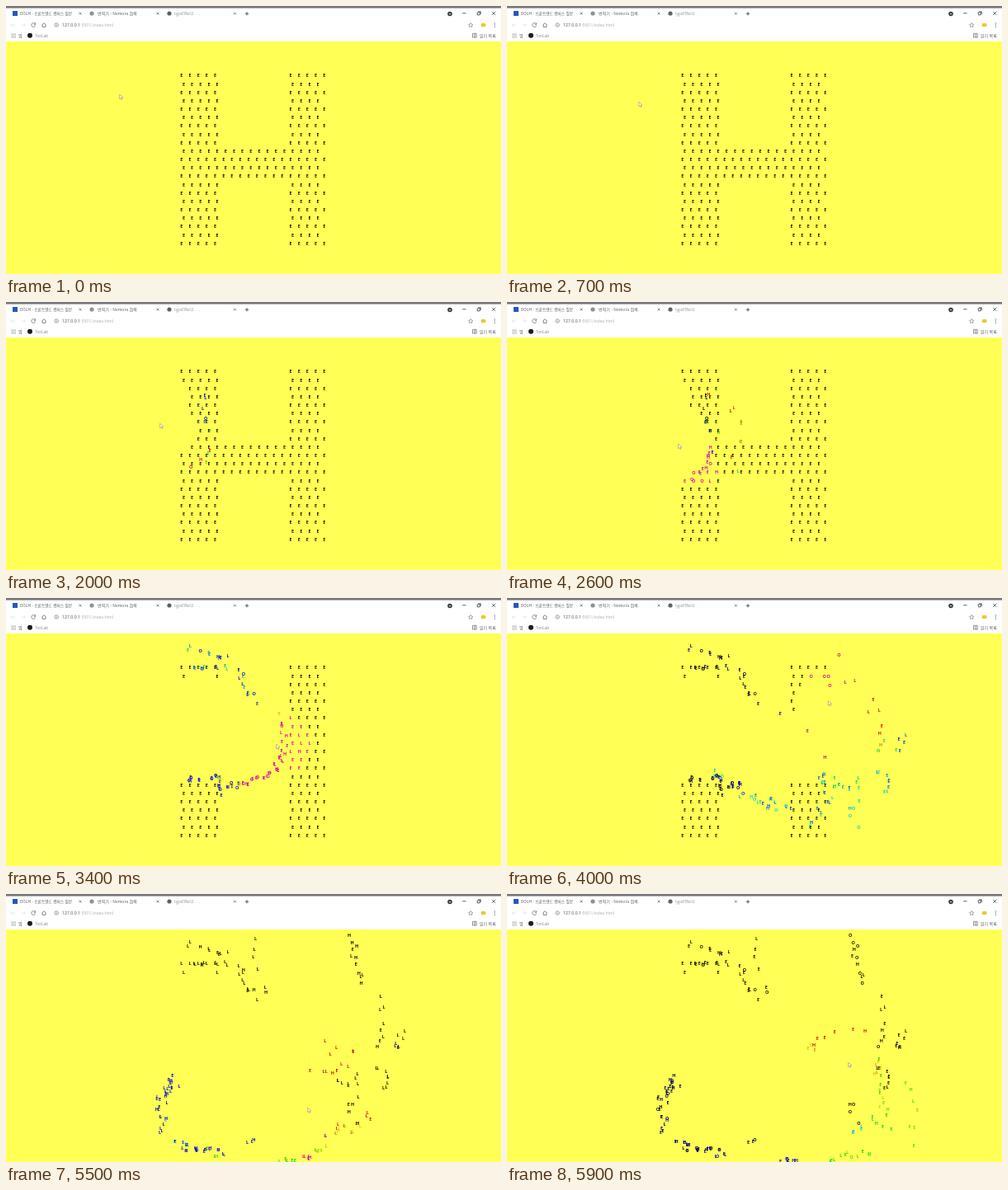
Recreate the animation shown at these times as an HTML page. Size 600 px wide and 325 px high, loop 6000 ms.

```html
<!DOCTYPE html>
<html lang="ko">
<head>
<meta charset="utf-8">
<title>typoEffect2</title>
<style>
html, body { margin: 0; width: 100%; height: 100%; overflow: hidden; background: #ffff55; }
svg { display: block; width: 600px; height: 325px; }
.ui { font: 5px "Noto Sans CJK KR", "Noto Sans CJK", sans-serif; fill: #5c5f63; }
.line { fill: none; stroke: #55585c; stroke-width: .7; }
.pale { stroke: #dddfe2; }
#letters { font: 700 5.4px "Open Sans", sans-serif; }
</style>
</head>
<body>
<svg viewBox="0 0 600 325" xmlns="http://www.w3.org/2000/svg">
  <rect width="600" height="325" fill="#ffff55"/>
  <rect width="600" height="43" fill="#fff"/>
  <rect width="600" height="2.6" fill="#77747a"/>
  <g class="ui">
    <rect x="8" y="6" width="6" height="6" fill="#2856bd"/>
    <text x="17" y="11" font-size="4.7">DOLM - 프론트엔드 캔버스 질문</text>
    <circle cx="104" cy="9" r="2.6" fill="#8793a3"/>
    <text x="111" y="11">번역기 - Nemora 검색</text>
    <circle cx="198" cy="9" r="2.6" fill="#5f6368"/>
    <text x="204" y="10.8" font-size="4.4" fill="#8b8e92">typoEffect2</text>
    <circle cx="538" cy="9.5" r="2.8" fill="#3c4043"/>
    <path d="M536.8 8.9h2.4l-1.2 1.5z" fill="#fff"/>
    <text x="68" y="24.9" font-family="Roboto, sans-serif" font-size="5.3" fill="#5c5f63">127.0.0.1<tspan fill="#b4b7bb">:5501/index.html</tspan></text>
    <text x="15" y="37.8">앱</text>
    <circle cx="29" cy="35.7" r="3" fill="#1b1b1d"/>
    <text x="35" y="37.6" font-size="4.7" fill="#85888c">TonLab</text>
    <text x="574" y="37.6">읽기 목록</text>
    <ellipse cx="578.7" cy="23" rx="3" ry="2.3" fill="#efc52e"/>
    <path d="M592 20.4h1v1h-1zm0 2.2h1v1h-1zm0 2.2h1v1h-1z"/>
    <g id="apps" fill="#85888c"></g>
  </g>
  <g class="line">
    <path d="M88.7 7.7l2.8 2.8m0-2.8l-2.8 2.8M182.6 7.7l2.8 2.8m0-2.8l-2.8 2.8M276 7.7l2.8 2.8m0-2.8l-2.8 2.8"/>
    <path d="M289.8 9.3h4.4m-2.2-2.2v4.4M553.2 8.8h4.4M589.2 6.8l4 4m0-4l-4 4M571.3 7.8h3v3h-3zm1-1h3v3" stroke="#222"/>
    <path class="pale" d="M10.5 23h-4.5m2-2l-2 2 2 2M19 23h4.5m-2-2l2 2-2 2"/>
    <path d="M35.2 21.6a2.4 2.4 0 1 0 .4 2m0-3.2v1.9h-1.9"/>
    <path d="M43.4 23l2.6-2.3 2.6 2.3m-4.4-.5v3h3.6v-3"/>
    <circle cx="61.2" cy="23" r="2.3" stroke-width=".5"/>
    <path d="M61.2 22.6v1.7m0-2.6v.5"/>
    <path d="M563.3 20.4l.8 1.8 1.9.2-1.4 1.3.4 1.9-1.7-1-1.7 1 .4-1.9-1.4-1.3 1.9-.2z" stroke-width=".5"/>
    <path d="M565.5 33.3h4.8v4.8h-4.8zm3 0v4.8m-2-3.3h1m-1 1.6h1" stroke-width=".6"/>
  </g>
  <g id="letters"></g>
  <path id="cursor" d="M0 0v5.2l1.3-1.1.9 1.9.9-.4-.8-1.9 1.7-.2z" fill="#fff" stroke="#666" stroke-width=".45"/>
</svg>
<script>
const LOOP = 6000, STEP = 100, REACH = 40, SETTLE = 40, WORD = 'HELLO';

// pointer: time, x, y
const track = [
  [0, 139, 110], [1300, 180, 127], [2000, 188, 150], [2600, 209, 175],
  [2800, 230, 135], [3000, 268, 145], [3200, 302, 176], [3400, 329, 180],
  [3750, 425, 190], [4150, 370, 90], [4400, 310, 120], [4600, 273, 195],
  [4850, 235, 250], [5050, 262, 272], [5250, 345, 275], [5500, 367, 262],
  [5620, 405, 258], [5900, 415, 207]
];
// time, letters advanced so far
const ticks = [[0, 0.5], [1300, 9.5], [2600, 20.5], [3400, 25.5], [4600, 35.5], [5500, 41.5], [5900, 45.5]];

function along(keys, t) {
  let i = 1;
  while (i < keys.length - 1 && keys[i][0] < t) i++;
  const a = keys[i - 1], b = keys[i];
  const k = Math.min(1, (t - a[0]) / (b[0] - a[0]));
  return a.slice(1).map((v, j) => v + (b[j + 1] - v) * k);
}

let seed = 7;
const rand = () => (seed = (seed * 16807) % 2147483647) / 2147483647;

// n points strewn loosely along a line through a few corners
function strew(n, spread, ...corners) {
  const keys = corners.map((p, i) => [i, ...p]);
  const span = corners.length - 1;
  return Array.from({ length: n }, (_, i) =>
    along(keys, (i + rand()) / n * span).map(v => v + (rand() * 2 - 1) * spread));
}

const letters = [];
for (let row = 0; row < 21; row++) {
  const odd = row % 2, bar = row > 8 && row < 13;
  for (let col = 0; col < 18 - odd; col++) {
    if (!bar && col > 4 && col < 13) continue;
    const x = 213 + odd * 2.6 + col * 10.17, y = 84.5 + row * 10.17;
    letters.push({ x, y, moves: [{ t: -1e6, x, y }], shift: 0, fade: 0.85 + rand() * 0.3 });
  }
}

// first contact with the pointer, or else its nearest approach
function touch(p, t0, t1) {
  let best = { t: t0, d: 1e9 };
  for (let t = t0; t <= t1 - 90; t += 10) {
    const [cx, cy] = along(track, t);
    const d = Math.hypot(p.x - cx, p.y - cy);
    if (d < best.d) best = { t, d };
    if (d < REACH) break;
  }
  return best;
}

// letters in the cleared area fly to the nearest free spot
function sweep(t0, t1, cleared, ...strewn) {
  const spots = strewn.flat(), used = spots.map(() => 0);
  for (const p of letters) {
    const { t, d } = touch(p, t0, t1);
    if (!cleared(p.x, p.y, d)) continue;
    let pick = 0, low = 1e9;
    spots.forEach(([x, y], i) => {
      const cost = Math.hypot(x - p.x, y - p.y) + used[i] * 500;
      if (cost < low) { low = cost; pick = i; }
    });
    const extra = used[pick]++ ? 3 : 0;
    p.x = spots[pick][0] + (rand() - 0.5) * extra;
    p.y = spots[pick][1] + (rand() - 0.5) * extra;
    p.moves.push({ t, x: p.x, y: p.y });
    p.shift = [0, 0, 0, 1, 3, 4][Math.floor(rand() * 6)];
  }
}

sweep(1300, 2600, (x, y, d) => d < REACH,
  strew(9, 5, [241, 100], [241, 140], [254, 160]),
  strew(9, 3, [248, 176], [240, 198], [222, 214]),
  strew(8, 7, [266, 125], [285, 150], [272, 212]));

sweep(2600, 3400,
  (x, y) => (x < 341 && y > 100 && y < 220) || (x > 220 && x < 250 && y > 90 && y < 101),
  strew(9, 6, [222, 63], [272, 70]),
  strew(8, 3, [226, 86], [270, 85]),
  strew(10, 4, [286, 89], [284, 103], [304, 126]),
  strew(10, 3, [217, 221], [258, 215], [261, 238]),
  strew(30, 4, [268, 228], [292, 226], [328, 208], [340, 178], [330, 140]));

sweep(3400, 4600,
  (x, y) => (x > 310 && y < 220) || (x > 266 && x < 341 && y > 200 && y < 240),
  strew(6, 6, [309, 55], [303, 85], [315, 121]),
  strew(11, 5, [417, 50], [424, 80], [435, 112]),
  strew(8, 4, [458, 116], [457, 160], [448, 190]),
  strew(7, 5, [483, 168], [471, 188]),
  strew(8, 3, [446, 205], [466, 222], [456, 237]),
  strew(10, 9, [422, 210], [420, 240], [428, 275]),
  strew(5, 3, [250, 210], [262, 222]),
  strew(20, 8, [278, 231], [297, 242], [345, 262]),
  strew(22, 9, [368, 216], [402, 220], [382, 260], [362, 278]));

sweep(4600, 5500, (x, y) => x < 398 && y > 200,
  strew(30, 7, [207, 224], [188, 240], [190, 290]),
  strew(18, 6, [204, 303], [230, 308], [262, 316]),
  strew(3, 3, [294, 299], [302, 302]),
  strew(24, 8, [325, 319], [367, 315], [400, 292], [455, 265]),
  strew(12, 8, [367, 210], [397, 210], [433, 188], [378, 178]),
  strew(30, 5, [200, 345], [420, 345]));

sweep(5500, 5900,
  (x, y) => x > 355 && x < 444 && y > 172 && y < 326 && !(x > 415 && y > 255),
  strew(10, 6, [366, 190], [378, 172], [437, 162]),
  strew(18, 5, [448, 195], [449, 232], [462, 285]),
  strew(10, 6, [472, 209], [494, 240], [492, 305]),
  strew(11, 4, [388, 322], [412, 316], [442, 314]));

const make = (name, home, attrs = {}) => {
  const node = document.createElementNS('http://www.w3.org/2000/svg', name);
  for (const key in attrs) node.setAttribute(key, attrs[key]);
  return home.appendChild(node);
};
const layer = document.getElementById('letters');
for (const p of letters) p.node = make('text', layer);
const apps = document.getElementById('apps');
for (let i = 0; i < 9; i++) {
  make('rect', apps, { x: 6.5 + i % 3 * 2, y: 33.5 + Math.floor(i / 3) * 2, width: 1.1, height: 1.1 });
}
const cursor = document.getElementById('cursor');

// pink, red, green, cyan, blue, then black
function tint(age) {
  if (age > 1500) return '#161600';
  const light = 45 * Math.min(1, (1500 - age) / 700);
  return `hsl(${Math.min(600, 315 + age * 0.4)} 90% ${light}%)`;
}

function draw(t) {
  const beat = 1 + Math.floor(along(ticks, t)[0]);
  for (const p of letters) {
    let i = p.moves.length - 1;
    while (p.moves[i].t > t) i--;
    const to = p.moves[i], from = p.moves[Math.max(0, i - 1)];
    const k = 1 - Math.exp((to.t - t) / SETTLE);
    p.node.setAttribute('x', (from.x + (to.x - from.x) * k - 1.7).toFixed(2));
    p.node.setAttribute('y', (from.y + (to.y - from.y) * k + 1.9).toFixed(2));
    p.node.setAttribute('fill', tint((t - to.t) * p.fade));
    p.node.textContent = WORD[(beat + (i ? p.shift : 0)) % 5];
  }
  const [x, y] = along(track, t);
  cursor.setAttribute('transform', `translate(${x - 1.3} ${y - 2.6})`);
}

let shown = -1;
function tick() {
  const t = Math.floor(performance.now() % LOOP / STEP) * STEP;
  if (t !== shown) draw(shown = t);
  requestAnimationFrame(tick);
}
tick();
</script>
</body>
</html>
```
